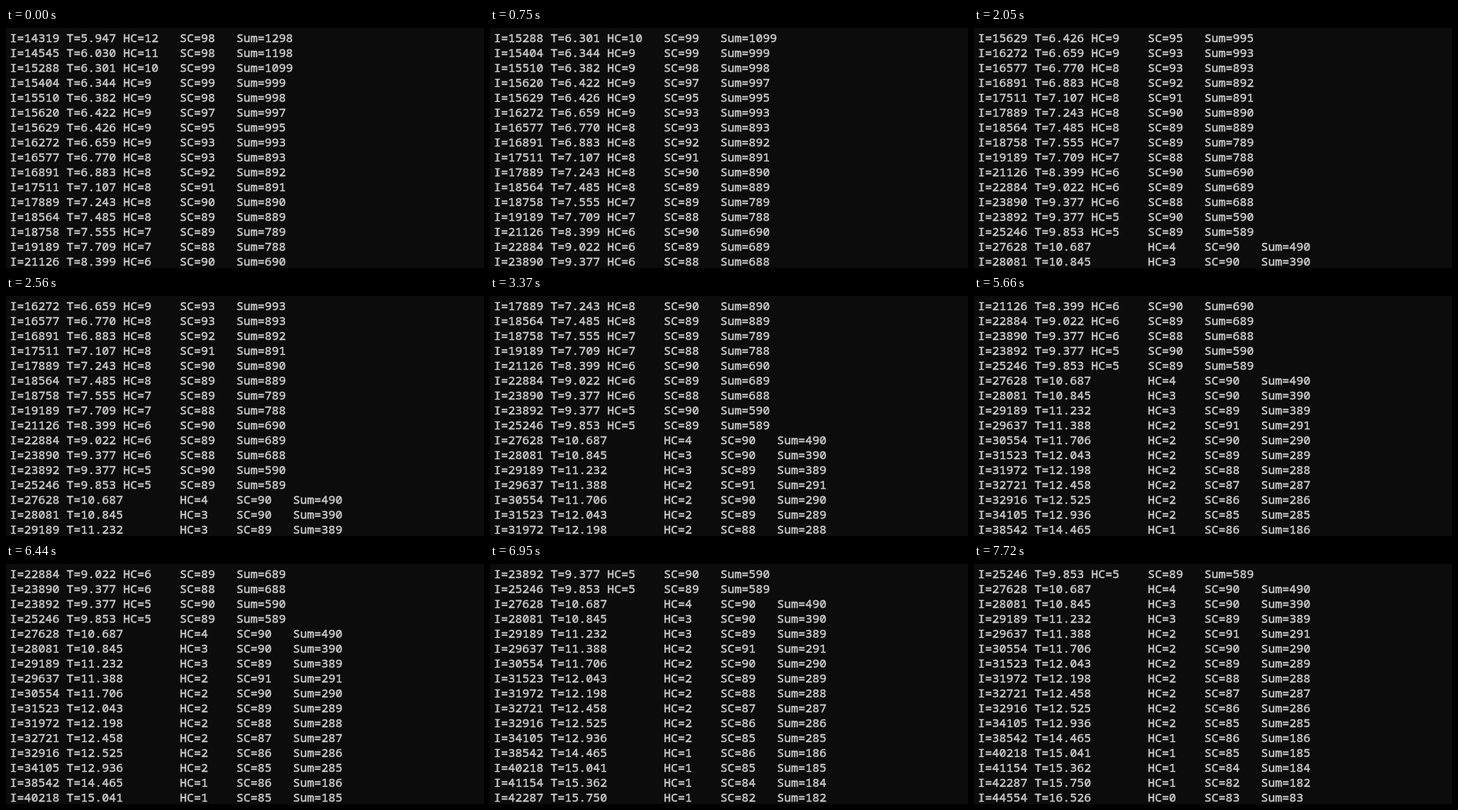
Write an HTML page that moves like this. It is 608 px wide and 306 px high and loops after 8 s.

```html
<!DOCTYPE html>
<html lang="en">
<head>
<meta charset="utf-8">
<title>Console log</title>
<style>
  html, body { margin: 0; width: 100%; height: 100%; overflow: hidden; background: #0c0c0c; }
  svg { display: block; width: 608px; height: 306px; }
  text {
    font: 15px "Noto Sans Mono", "DejaVu Sans Mono", monospace;
    font-variant-ligatures: none;
    fill: #ccc;
    stroke: #ccc;
    stroke-width: 0.45px;
    white-space: pre;
  }
</style>
</head>
<body>
<svg id="screen" viewBox="0 0 608 306"></svg>
<script>
const LOOP = 8000, TICK = 257.3, LEAD = 23;
const ROWS = 16, LINE = 19, LEFT = 5, BASELINE = 18;

// Iterations at which the score improved, with the gain where it is not 1.
const improvements = `14319:0 14545:100 15288:99 15404:100 15510 15620 15629:2 16272:2
  16577:100 16891 17511 17889 18564 18758:100 19189 21126:98 22884 23890 23892:98 25246
  27628:99 28081:100 29189 29637:98 30554 31523 31972 32721 32916 34105
  38542:99 40218 41154 42287:2 44554:99`;

// Screen refresh at which each further line appears.
const arrivals = [1, 3, 5, 5, 8, 8, 10, 11, 12, 13, 13, 15, 15, 16, 22, 25, 26, 27, 30];

// Pads to the next 8-column tab stop.
const tab = s => s.padEnd(8 * (Math.floor(s.length / 8) + 1));

// Iterations get slightly faster as the search settles.
const seconds = i => 0.00033 * i + 0.53 * Math.log(i) - 3.85;

let sum = 1298;
const log = improvements.split(/\s+/).map(entry => {
  const [i, gain = 1] = entry.split(":");
  sum -= gain;
  const fields = ["I=" + i, "T=" + seconds(i).toFixed(3), "HC=" + Math.floor(sum / 100), "SC=" + sum % 100];
  return fields.map(tab).join("") + "Sum=" + sum;
});

const screen = document.getElementById("screen");
const lines = Array.from({ length: ROWS }, (_, n) => {
  const line = document.createElementNS("http://www.w3.org/2000/svg", "text");
  line.setAttribute("x", LEFT);
  line.setAttribute("y", BASELINE + n * LINE);
  return screen.appendChild(line);
});

let shown = -1;
function render(ms) {
  const tick = Math.floor((ms + LEAD) / TICK);
  const top = arrivals.filter(at => at <= tick).length;
  if (top === shown) return;
  shown = top;
  lines.forEach((line, n) => { line.textContent = log[top + n]; });
}

const start = performance.now();
function frame() {
  render((performance.now() - start) % LOOP);
  requestAnimationFrame(frame);
}
frame();
</script>
</body>
</html>
```
